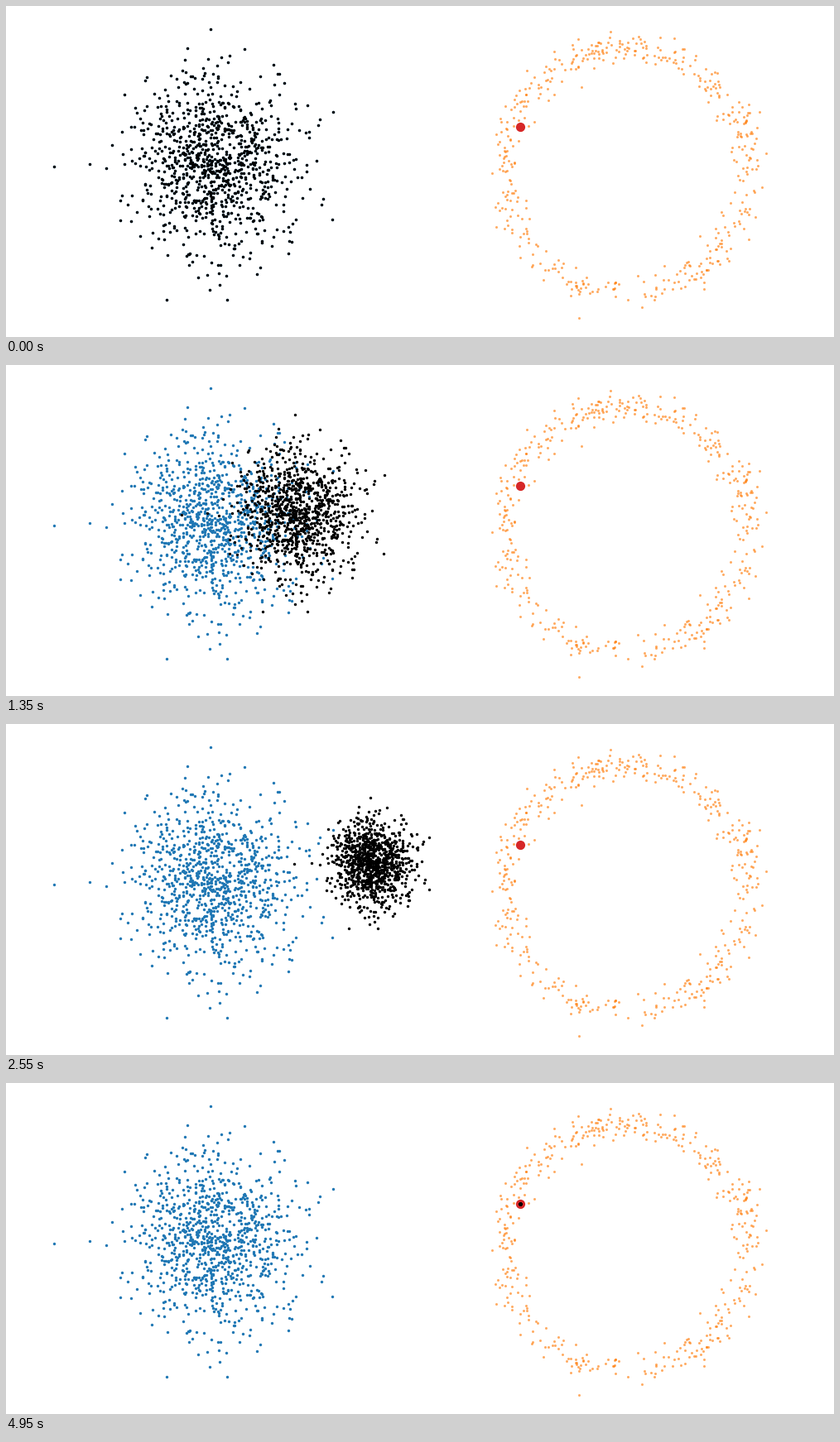
Recreate the animation shown at these times as a matplotlib script. Size 1000 by 400 pixels, loop 5 s.

```python
import matplotlib.pyplot as plt
import numpy as np
from matplotlib.animation import FuncAnimation

WIDTH, HEIGHT, DPI = 1000, 400, 100
FRAMES, INTERVAL = 100, 50
CLOUD_SIZE, RING_SIZE = 1000, 470
GOAL = np.array([621.0, 146.2])

# The farthest points on each side set the outline of the cloud.
OUTERMOST = np.array([(58, 194), (101, 191), (247, 28), (395, 128),
                      (394, 258), (267, 355), (194, 355)])


def make_cloud(rng):
    """Gaussian blob, cut at an ellipse inside the outermost points."""
    z = rng.normal(size=(2 * CLOUD_SIZE, 2))
    z = z[np.hypot(*z.T) < 2.9][:CLOUD_SIZE - len(OUTERMOST)]
    return np.vstack([OUTERMOST, (251, 196) + z * (49, 52)])


def make_ring(rng):
    """Noisy circle with uniformly random angles."""
    angle = rng.uniform(0, 2 * np.pi, RING_SIZE)
    radius = rng.normal(148.5, 9.5, RING_SIZE)
    return np.column_stack([749 + radius * np.cos(angle),
                            199 - radius * np.sin(angle)])


def dots(points, diameter, color, **style):
    area = (diameter * 72 / DPI) ** 2
    return ax.scatter(*points.T, s=area, color=color, linewidths=0, **style)


rng = np.random.default_rng(7)
cloud = make_cloud(rng)
ring = make_ring(rng)

fig = plt.figure(figsize=(WIDTH / DPI, HEIGHT / DPI), dpi=DPI, facecolor="white")
ax = fig.add_axes([0, 0, 1, 1])
ax.set(xlim=(0, WIDTH), ylim=(HEIGHT, 0))
ax.axis("off")

dots(cloud, 3.4, "tab:blue")
dots(ring, 3.0, "tab:orange", alpha=0.65)
dots(GOAL[None], 11.2, "tab:red")
movers = dots(cloud, 3.4, "black")


def update(frame):
    t = frame / (FRAMES - 1)
    movers.set_offsets((1 - t) * cloud + t * GOAL)
    return movers,


anim = FuncAnimation(fig, update, frames=FRAMES, interval=INTERVAL,
                     repeat=True, repeat_delay=0, blit=False)
plt.show()
```
